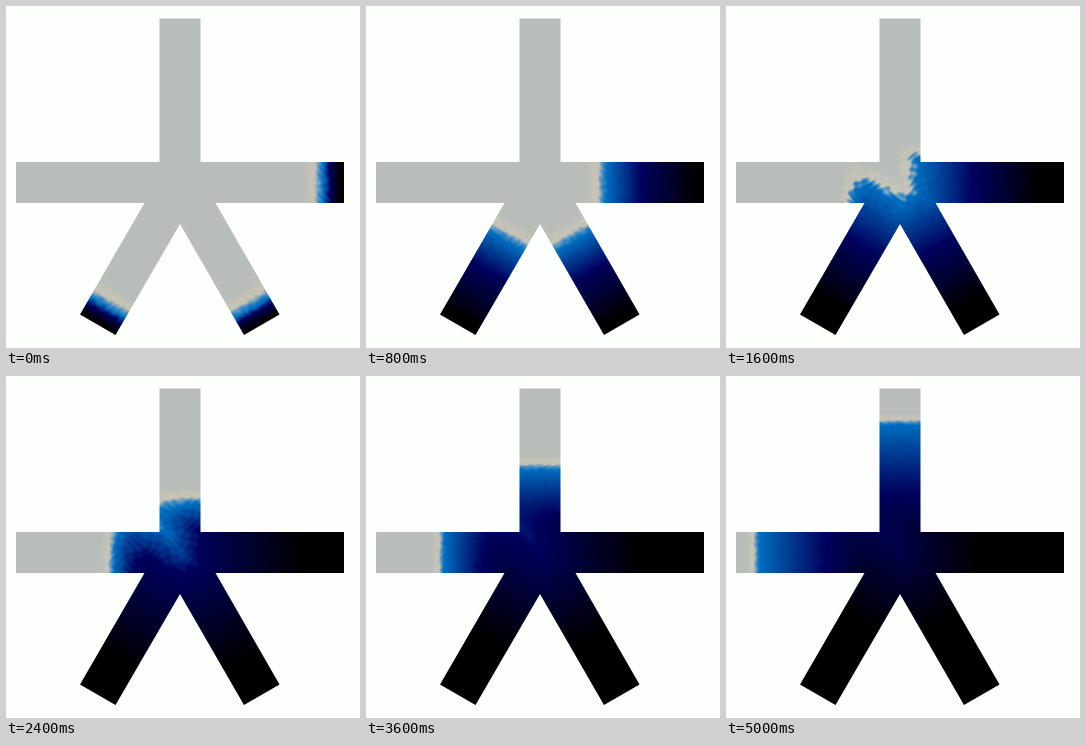
Recreate the animation shown at these times as an HTML page with a canvas. Size 354 px wide and 342 px high, loop 5100 ms.

```html
<!DOCTYPE html>
<html lang="en">
<head>
<meta charset="utf-8">
<title>Cooling star</title>
<style>
  html, body { margin: 0; width: 100%; height: 100%; overflow: hidden; background: #fcfffc; }
  canvas { display: block; }
</style>
</head>
<body>
<canvas id="stage" width="354" height="342"></canvas>
<script>
const W = 354, H = 342, STEP = 100, STEPS = 51;
const ctx = document.getElementById('stage').getContext('2d');
const layer = document.createElement('canvas');
layer.width = W;
layer.height = H;
const layerCtx = layer.getContext('2d');
const image = layerCtx.createImageData(W, H);
const pixels = new Uint32Array(image.data.buffer);

const star = new Path2D('M153.5 12.5H194.5V156H338V197H209.5L273.5 308.5L238 329L174 218L109.5 329L74 308.5L138.5 197H10V156H153.5Z');

// Travel distance from a cooled tip, spreading out past the mouth of its arm.
function travel(x, y, mx, my, nx, ny, length) {
  const along = (x - mx) * nx + (y - my) * ny;
  const across = Math.abs((x - mx) * ny - (y - my) * nx) - 20.6;
  if (along < 0 && across < 2) return length + along;
  return length + Math.hypot(along, Math.max(0, across));
}

// Fronts flatten as they run down an uncooled arm.
const flatten = (a, b) => Math.hypot(a, b * Math.exp(-a / 40));

function distance(x, y) {
  let d = Math.min(
    travel(x, y, 194, 176.5, -1, 0, 144),
    travel(x, y, 156, 207.5, 0.5, -0.866, 129),
    travel(x, y, 192, 207.5, -0.5, -0.866, 129));
  if (x < 138 && y < 198) {
    const a = 138 - x;
    d = Math.min(d, 129 + flatten(a, 197 - y)) + 0.6 * a;
  } else if (y < 156) {
    const a = 156 - y;
    d = Math.min(d, 144 + flatten(a, 194 - x)) + 0.1 * a + 0.003 * a * a;
  }
  const ripple = Math.sin(x * 0.43 + 2 * Math.sin(y * 0.21)) * Math.sin(y * 0.47 + 2 * Math.sin(x * 0.17));
  return d + ripple * (1.2 + 2.5 * Math.exp(-(((d - 150) / 25) ** 2)));
}

const field = new Uint16Array(W * H);
for (let y = 0; y < H; y++) {
  for (let x = 0; x < W; x++) {
    field[y * W + x] = Math.max(0, Math.min(1023, Math.round(distance(x + 0.5, y + 0.5) * 2)));
  }
}

// step, edge of black, navy, freezing front
const keys = [
  [0, 4, 14, 24], [3, 5, 34, 62], [8, 8, 62, 101], [16, 25, 90, 150],
  [24, 40, 145, 181], [32, 55, 162, 207], [41, 75, 170, 254], [50, 85, 190, 300]
];

const mix = (a, b, k) => a.map((v, i) => v + (b[i] - v) * k);

function sample(list, at) {
  if (at <= list[0][0]) return list[0];
  for (let i = 1; i < list.length; i++) {
    const a = list[i - 1], b = list[i];
    if (at <= b[0]) return mix(a, b, (at - a[0]) / (b[0] - a[0]));
  }
  return list[list.length - 1];
}

const palette = new Uint32Array(1024);

function draw(step) {
  const [, black, navy, front] = sample(keys, step);
  const stops = [
    [black, 0, 0, 0],
    [navy, 0, 0, 92],
    [front - 4, 0, 108, 190],
    [front, 55, 136, 196],
    [front + 5, 196, 193, 181],
    [front + 9, 198, 195, 184],
    [front + 17, 184, 189, 185]
  ];
  for (let i = 0; i < palette.length; i++) {
    const [, r, g, b] = sample(stops, i / 2);
    palette[i] = (255 << 24) | (b << 16) | (g << 8) | r;
  }
  for (let i = 0; i < pixels.length; i++) pixels[i] = palette[field[i]];
  layerCtx.putImageData(image, 0, 0);

  ctx.fillStyle = '#fcfffc';
  ctx.fillRect(0, 0, W, H);
  ctx.save();
  ctx.clip(star);
  ctx.drawImage(layer, 0, 0);
  ctx.restore();
}

let shown = -1;
function tick() {
  const step = Math.floor(performance.now() / STEP) % STEPS;
  if (step !== shown) draw(shown = step);
  requestAnimationFrame(tick);
}
tick();
</script>
</body>
</html>
```
